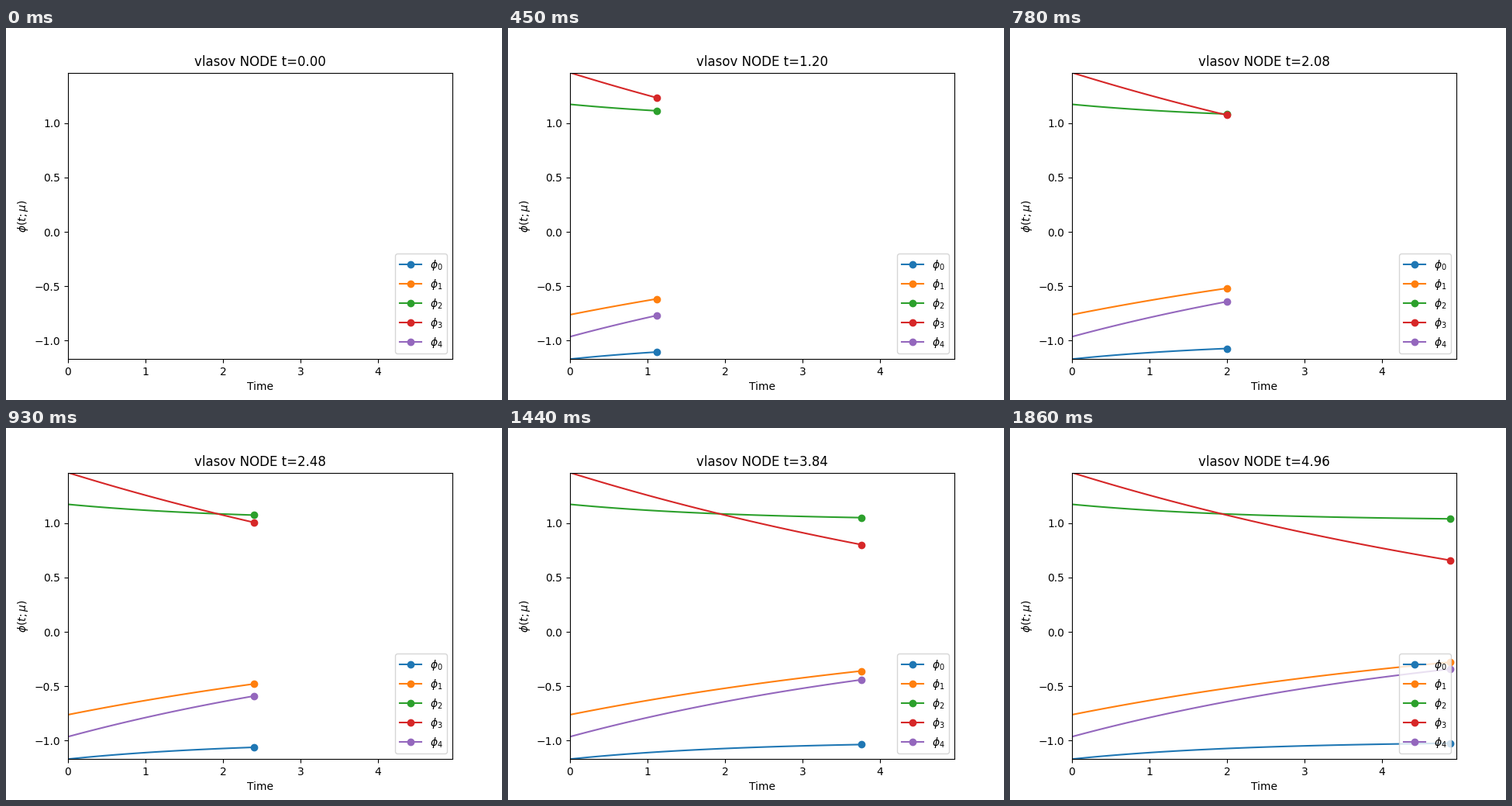
Animation of 640x480 px, one loop 1890 ms. Source, as a matplotlib script:

```python
import numpy as np
import matplotlib.pyplot as plt
from matplotlib.animation import FuncAnimation

FRAMES = 63
DT = 0.08
times = DT * np.arange(FRAMES)


def relax(start, limit, rate):
    """Exponential approach from start towards limit."""
    return limit + (start - limit) * np.exp(-rate * times)


curves = [
    relax(-1.1693, -1.0053, 0.45),
    relax(-0.7615, 0.1405, 0.157),
    relax(1.1725, 1.0225, 0.45),
    relax(1.4638, -0.2902, 0.126),
    relax(-0.9634, 0.0926, 0.182),
]

fig, ax = plt.subplots(figsize=(6.4, 4.8), dpi=100)
lines = [ax.plot([], [], "-o", label=rf"$\phi_{k}$")[0]
         for k in range(len(curves))]
ax.set_xlim(0, times[-1])
ax.set_ylim(np.min(curves), np.max(curves))
ax.set_xlabel("Time")
ax.set_ylabel(r"$\phi(t;\mu)$")
ax.legend(loc="lower right")
title = ax.set_title("vlasov NODE t=0.00")


def update(i):
    for line, y in zip(lines, curves):
        line.set_data(times[:i], y[:i])
        line.set_markevery([i - 1] if i else None)  # dot on the newest point
    title.set_text(f"vlasov NODE t={times[i]:.2f}")
    return [*lines, title]


anim = FuncAnimation(fig, update, frames=FRAMES, interval=30,
                     repeat=True, repeat_delay=0)
plt.show()
```
